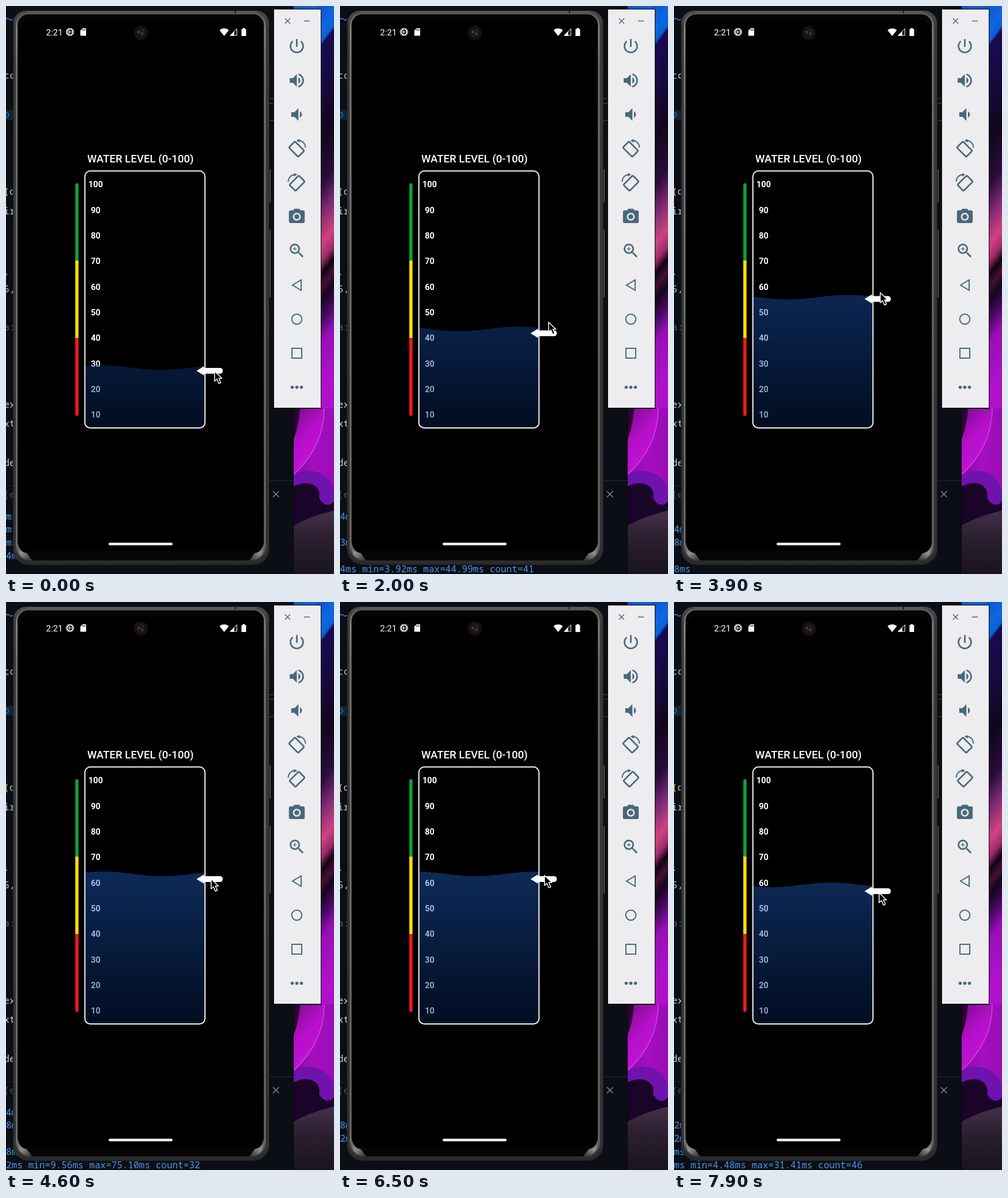
Animation, 569 px wide and 984 px high, one loop 8000 ms. Source, as an HTML page with a canvas:

```html
<!DOCTYPE html>
<html lang="en">
<head>
<meta charset="utf-8">
<title>Water level</title>
<style>
html, body { margin: 0; width: 100%; height: 100%; overflow: hidden; background: #0b0e14; }
canvas { display: block; width: 569px; height: 984px; }
</style>
</head>
<body>
<canvas id="stage" width="569" height="984"></canvas>
<script>
const canvas = document.getElementById('stage');
const W = 569, H = 984, LOOP = 8000, STEP = 100;
const MONO = '"Noto Sans Mono", monospace', SANS = 'Roboto, sans-serif';
let c = canvas.getContext('2d');

// time, mean water line, arrow y, pointer x, pointer y, x of the wave crest
const KEYS = [
  [0, 626.5, 632, 361, 632, 165],
  [1100, 627, 619, 361, 584, 230],
  [2000, 559.5, 567, 361, 547, 310],
  [3200, 538, 535, 359, 513, 436],
  [4600, 471, 480, 355, 479, 584],
  [6500, 471, 480, 354, 473, 755],
  [7900, 490, 501, 355, 503, 897]
];

const LOG = ['ms', 'ms', 'ms', '4ms', '', '3ms', '',
  '4ms min=3.92ms max=44.99ms count=41', '8ms', '', '8ms',
  '2ms min=9.56ms max=75.10ms count=32', '', '', '2ms', '2ms', 'ms',
  'ms min=4.48ms max=31.41ms count=46'];
const SCROLLS = [500, 1000, 1600, 2500, 3100, 3800, 4400, 5500, 6300, 6800, 7100, 7400, 7700];

const CODE = [
  ['cc', 120, '#b9bec8'], ['o', 187, '#3d6f9f'], ['(', 321, '#e8c84a'], [' d', 321, '#b9bec8'],
  ['ir', 355, '#b9bec8'], ['.', 460, '#a9aeb8'], ['5,', 490, '#b9bec8'], ['a:', 556, '#585d66'],
  ['ex', 690, '#c3c8d0'], ['xt', 723, '#c3c8d0'], ['de', 791, '#c3c8d0'], ['(e', 846, '#484d56']
];

const ICON = {
  power: 'M13 3h-2v10h2V3zm4.83 2.17l-1.42 1.42C17.99 7.86 19 9.81 19 12c0 3.87-3.13 7-7 7s-7-3.13-7-7c0-2.19 1.01-4.14 2.58-5.42L6.17 5.17C4.23 6.82 3 9.26 3 12c0 4.97 4.03 9 9 9s9-4.03 9-9c0-2.74-1.23-5.18-3.17-6.83z',
  loud: 'M3 9v6h4l5 5V4L7 9H3zm13.5 3c0-1.77-1.02-3.29-2.5-4.03v8.05c1.48-.73 2.5-2.25 2.5-4.02zM14 3.23v2.06c2.89.86 5 3.54 5 6.71s-2.11 5.85-5 6.71v2.06c4.01-.91 7-4.49 7-8.77s-2.99-7.86-7-8.77z',
  quiet: 'M18.5 12c0-1.77-1.02-3.29-2.5-4.03v8.05c1.48-.73 2.5-2.25 2.5-4.02zM5 9v6h4l5 5V4L9 9H5z',
  camera: 'M9 2L7.17 4H4c-1.1 0-2 .9-2 2v12c0 1.1.9 2 2 2h16c1.1 0 2-.9 2-2V6c0-1.1-.9-2-2-2h-3.17L15 2H9zm3 15c-2.76 0-5-2.24-5-5s2.24-5 5-5 5 2.24 5 5-2.24 5-5 5z',
  zoom: 'M15.5 14h-.79l-.28-.27C15.41 12.59 16 11.11 16 9.5 16 5.91 13.09 3 9.5 3S3 5.91 3 9.5 5.91 16 9.5 16c1.61 0 3.09-.59 4.23-1.57l.27.28v.79l5 4.99L20.49 19l-4.99-5zm-6 0C7.01 14 5 11.99 5 9.5S7.01 5 9.5 5 14 7.01 14 9.5 11.99 14 9.5 14zm2.5-4h-2v2H9v-2H7V9h2V7h1v2h2v1z'
};

function rect(x, y, w, h, fill) {
  c.fillStyle = fill;
  c.fillRect(x, y, w, h);
}

function round(x, y, w, h, r, fill, stroke, lw = 1) {
  c.beginPath();
  c.roundRect(x, y, w, h, r);
  if (fill) { c.fillStyle = fill; c.fill(); }
  if (stroke) { c.strokeStyle = stroke; c.lineWidth = lw; c.stroke(); }
}

function disc(x, y, r, fill) {
  c.beginPath();
  c.arc(x, y, r, 0, 7);
  c.fillStyle = fill;
  c.fill();
}

function fillPath(d, fill) {
  c.fillStyle = fill;
  c.fill(new Path2D(d));
}

function strokePath(d, stroke, lw) {
  c.strokeStyle = stroke;
  c.lineWidth = lw;
  c.stroke(new Path2D(d));
}

function text(s, x, y, font, fill, align = 'left') {
  c.font = font;
  c.fillStyle = fill;
  c.textAlign = align;
  c.fillText(s, x, y);
}

function ramp(x0, y0, x1, y1, stops) {
  const g = c.createLinearGradient(x0, y0, x1, y1);
  stops.forEach(([at, color]) => g.addColorStop(at, color));
  return g;
}

function icon(d, y, color) {
  c.save();
  c.translate(504.5 - 12 * 1.37, y - 12 * 1.37);
  c.scale(1.37, 1.37);
  fillPath(d, color);
  c.restore();
}

function turnIcon(y, side, color) {
  c.save();
  c.translate(504.5, y);
  c.scale(side, 1);
  strokePath('M2 -14.5 C9 -15 14.5 -10 15 -2', color, 2);
  fillPath('M-1 -14.5 L5 -17 L5 -11 Z', color);
  c.translate(-.5, .5);
  c.rotate(Math.PI / 4);
  round(-11.5, -7.5, 23, 15, 2, null, color, 2.7);
  c.restore();
}

function wallpaper() {
  rect(499, 0, 70, 10, ramp(499, 0, 569, 0, [[0, '#1256c4'], [1, '#0c68e2']]));
  c.save();
  c.beginPath();
  c.rect(540, 0, 29, 700);
  c.clip();
  c.transform(1, -1.3, 0, 1, 0, 1.3 * 546);
  rect(530, -20, 50, 800, ramp(0, 0, 0, 740, [
    [0, '#0e55c2'], [.055, '#0c68e2'], [.085, '#0b5fd6'], [.095, '#190a52'], [.2, '#170a3e'],
    [.31, '#10061c'], [.42, '#290c3a'], [.49, '#7d2a74'], [.56, '#cf437f'], [.60, '#9c2c6c'],
    [.63, '#12040f'], [.66, '#431036'], [.69, '#15051d'], [.74, '#4a0a62'], [.79, '#960fb6'],
    [.9, '#ae12c8'], [1, '#b010cc']]));
  c.restore();

  rect(499, 697, 70, 287, ramp(499, 0, 569, 0, [[0, '#8a0b9e'], [.5, '#a50fc0'], [1, '#9a0cb8']]));
  fillPath('M499 697 H552 C552 745 531 782 499 812 Z',
    ramp(499, 720, 545, 760, [[0, '#8a0e9c'], [.5, '#b40fc8'], [1, '#c012d4']]));
  fillPath('M499 697 H510 C508 722 504 738 499 750 Z', '#2a0432');
  strokePath('M552 697 C552 745 531 782 499 812', '#d24fe0', 1.3);
  fillPath('M499 812 C528 797 560 808 569 838 V984 H499 Z', '#6f12ae');
  fillPath('M499 832 C528 818 548 834 543 852 C552 868 562 866 569 858 V984 H499 Z', '#1a0528');
  fillPath('M499 900 C525 886 545 880 569 874 V984 H499 Z',
    ramp(0, 876, 0, 984, [[0, '#43304a'], [.4, '#2c2031'], [1, '#19141c']]));
}

function toolbar() {
  const ink = '#48697a', x = 504.5;
  rect(464, 5, 83, 693, '#08090c');
  rect(465, 6, 81, 690, '#edecee');
  strokePath('M484 21.5 L493 30.5 M493 21.5 L484 30.5 M517 26 H527', ink, 1.5);
  icon(ICON.power, 69.5, ink);
  icon(ICON.loud, 129, ink);
  icon(ICON.quiet, 188, ink);
  turnIcon(247.5, 1, ink);
  turnIcon(306.5, -1, ink);
  icon(ICON.camera, 365, ink);
  disc(x, 365, 4.3, ink);
  icon(ICON.zoom, 424, ink);
  strokePath('M512 474.5 V492.5 L497 483.5 Z', ink, 2);
  c.beginPath();
  c.arc(x, 542.5, 8.8, 0, 7);
  c.stroke();
  c.strokeRect(496, 593, 17, 17);
  for (const d of [-8, 0, 8]) disc(x + d, 660.5, 2.8, ink);
}

function phone() {
  const shell = ramp(0, 8, 0, 968, [[0, '#4c4b4a'], [.03, '#3a3939'], [.97, '#333233'], [1, '#2a292a']]);
  round(12.5, 8, 444, 960, [22, 22, 27, 27], shell, '#1d1d1e', 1);
  round(18.5, 13, 430.5, 949, [20, 20, 25, 25], '#050505', ramp(0, 13, 0, 962, [
    [0, '#5a5958'], [.03, '#858382'], [.1, '#737170'], [.9, '#6a6867'], [.97, '#6c6b6b'], [1, '#2c2c2d']]), 3);
  strokePath('M36 10 H434', '#666564', 1.5);
  strokePath('M398 8 V13', '#1b1b1b', 2);

  // light caught in the lower corners
  for (const [x, s] of [[20, 1], [447.5, -1]]) {
    c.save();
    c.translate(x, 0);
    c.scale(s, 1);
    fillPath('M0 928 C2 940 6 946 16 948 L26 961 C10 961 0 952 0 936 Z',
      ramp(0, 930, 26, 962, [[0, '#5a5a5b'], [.45, '#8f8f90'], [1, '#222223']]));
    c.restore();
  }
  round(21.5, 25, 424.5, 919, [20, 20, 14, 14], '#000');

  for (const [y, h] of [[283, 57], [388, 117]]) {
    rect(456.5, y, 2.5, h, '#2b2b2c');
    rect(458, y, 1, h, '#66686b');
  }
  for (const y of [160, 168, 198]) rect(457, y, 7, 1, '#4a4c50');
}

function statusBar() {
  text('2:21', 69.5, 51, `15px ${SANS}`, '#fff');
  c.strokeStyle = '#fff';
  c.lineWidth = 1.6;
  c.beginPath();
  c.arc(111, 45, 5.2, 0, 7);
  c.stroke();
  for (let i = 0; i < 12; i++) {
    const a = i * Math.PI / 6, u = Math.cos(a), v = Math.sin(a);
    strokePath(`M${111 + 5 * u} ${45 + 5 * v} L${111 + 7.3 * u} ${45 + 7.3 * v}`, '#fff', 1.5);
  }
  strokePath('M107 45 H115 M111 45 L108.5 41 M111 45 L108.5 49', '#fff', 1.1);
  fillPath('M133 38.5 H139 V51.5 H129 V42.5 Z', '#fff');
  strokePath('M133 40 V43 M135.2 40 V43 M137.3 40 V43', '#000', .9);

  disc(234, 46.5, 12.5, '#121213');
  disc(234, 46.5, 7.5, '#1e1815');
  disc(230.5, 45, 2, '#6a3d20');
  disc(236.5, 48, 2.2, '#5b341c');
  disc(238, 42, 1.2, '#2e4454');

  fillPath('M378.5 52 L370.5 42 C375 37.7 382 37.7 386.5 42 Z', '#fff');
  strokePath('M389 51 L400.5 39.5 V51 Z', '#fff', 1);
  fillPath('M388 51.5 L396 43.5 V51.5 Z', '#fff');
  fillPath('M408.5 40 H410.5 V38.3 H414.5 V40 H416.5 V52 H408.5 Z', '#fff');
}

function backdrop() {
  rect(0, 0, W, H, '#0b0e14');
  rect(0, 180, 12, 17, '#10243a');
  strokePath('M0 23 Q3 20 6 23 T12 23', '#3c8fe0', 1.5);
  rect(0, 831, 14, 1, '#20252d');
  for (const [s, y, color] of CODE) text(s, -4, y + 6, `16.8px ${MONO}`, color);
  rect(456, 822, 43, 1, '#262b33');
  strokePath('M463 840.5 L473.5 851 M473.5 840.5 L463 851', '#8b9098', 1.3);
  wallpaper();
  rect(498, 697, 1, 287, '#05060a');
}

function foreground() {
  phone();
  statusBar();
  toolbar();
  text('WATER LEVEL (0-100)', 141, 270.5, `500 18.6px ${SANS}`, '#fff');
  round(120.2, 307, 5.6, 140, [3, 3, 0, 0], '#11a03a');
  round(120.2, 570, 5.6, 140, [0, 0, 3, 3], '#f01a20');
  rect(120.2, 441, 5.6, 134, '#f9dc07');
  for (let i = 0; i < 10; i++)
    text(100 - i * 10, 155.5, 314.2 + i * 44.33, `bold 14.5px ${SANS}`, '#fff', 'center');
  round(178, 929.7, 111, 4.6, 2.3, '#eee');
}

// Still parts are painted once onto their own layers.
function layer(paint) {
  const el = document.createElement('canvas'), main = c;
  el.width = W;
  el.height = H;
  c = el.getContext('2d');
  paint();
  c = main;
  return el;
}

function pose(t) {
  let i = 0;
  while (i < KEYS.length - 2 && t > KEYS[i + 1][0]) i++;
  const a = KEYS[i], b = KEYS[i + 1], k = Math.min(1, (t - a[0]) / (b[0] - a[0]));
  return a.map((v, j) => v + (b[j] - v) * k);
}

function terminal(t) {
  const top = SCROLLS.filter(s => t >= s).length;
  for (let r = 0; r < 5; r++)
    text(LOG[top + r] || '', 0, 889.5 + r * 22.8, `16.05px ${MONO}`, '#4b97ec');
}

function water(level, crest) {
  c.save();
  c.beginPath();
  c.roundRect(137, 286, 208, 445, 9);
  c.clip();
  c.beginPath();
  c.moveTo(136, 732);
  for (let x = 136; x <= 346; x += 2)
    c.lineTo(x, level - 4 * Math.cos((x - crest) * 2 * Math.PI / 208));
  c.lineTo(346, 732);
  c.fillStyle = ramp(0, 450, 0, 731, [[0, 'rgba(34,108,226,.4)'], [1, 'rgba(2,28,74,.44)']]);
  c.fill();
  c.restore();
  round(136.8, 285.8, 208.4, 445.2, 9.5, null, '#f4f4f6', 2);
}

function arrow(y) {
  round(341, y - 5, 35, 10, [0, 4.5, 4.5, 0], '#fff');
  fillPath(`M330.5 ${y} L343.5 ${y - 8} V${y + 8} Z`, '#fff');
}

function pointer(x, y) {
  c.save();
  c.translate(x, y);
  c.lineJoin = 'round';
  const d = 'M.8 .8 V18 L4.8 14.3 L8.2 22 L11.6 20.5 L8.3 13 H13.6 Z';
  fillPath(d, '#000');
  strokePath(d, '#fff', 1.5);
  c.restore();
}

const back = layer(backdrop), front = layer(foreground);

function draw(t) {
  const [, level, arrowY, px, py, crest] = pose(t);
  c.drawImage(back, 0, 0);
  terminal(t);
  c.drawImage(front, 0, 0);
  water(level, crest);
  arrow(arrowY);
  pointer(px, py);
}

const start = performance.now();
function tick() {
  const t = (performance.now() - start) % LOOP;
  draw(Math.floor(t / STEP) * STEP);
  requestAnimationFrame(tick);
}
tick();
</script>
</body>
</html>
```
